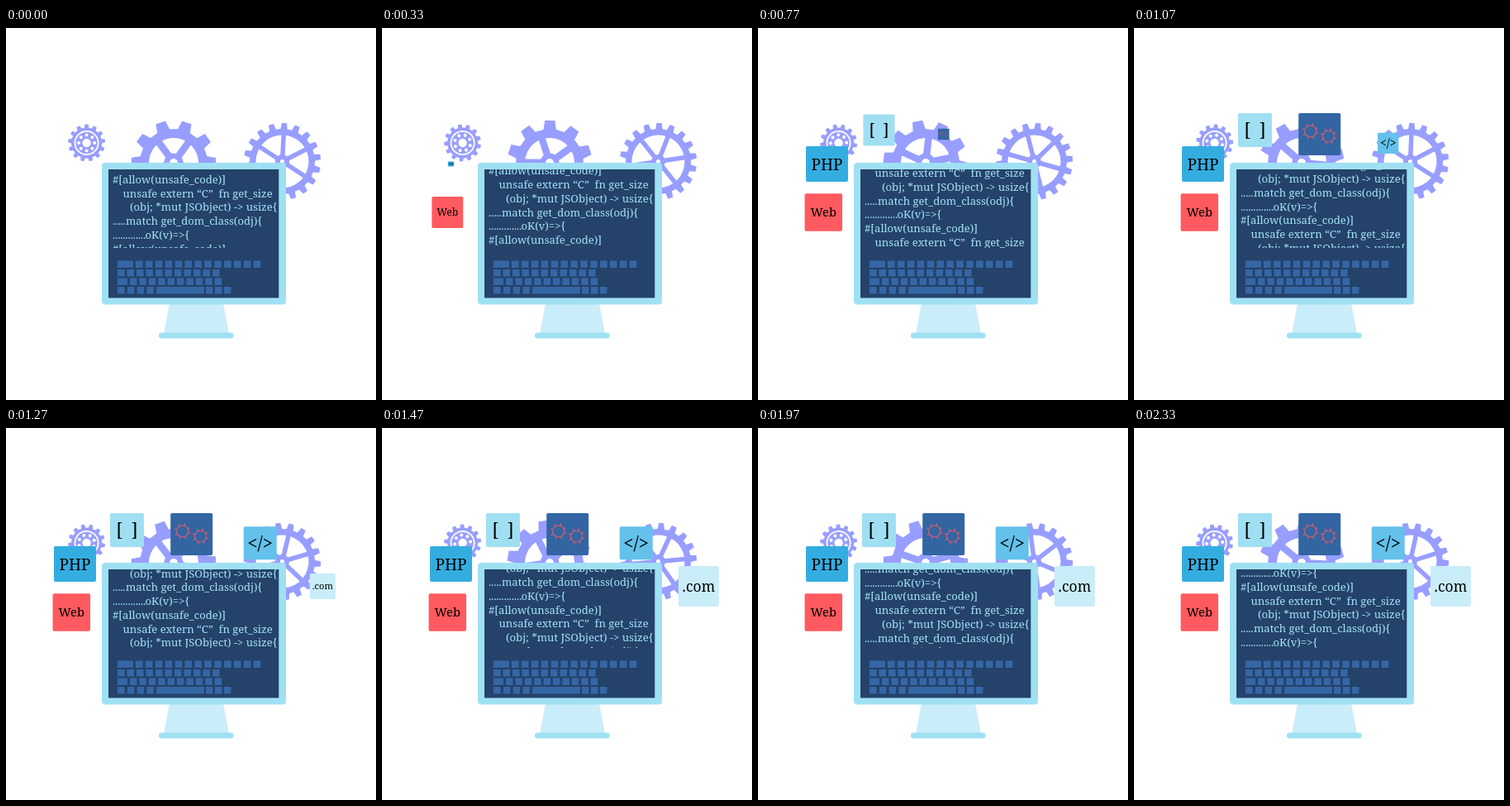
Write an HTML page that moves like this. It is 448x450 px and loops after 2.36 s.

```html
<!DOCTYPE html>
<html lang="en">
<head>
<meta charset="utf-8">
<title>Coding</title>
<style>
html, body { margin: 0; width: 100%; height: 100%; overflow: hidden; background: #fff; }
svg { display: block; width: 448px; height: 450px; }
text { font-family: "Noto Serif", "Liberation Serif", serif; }
#code { font-size: 13.1px; fill: #a5e3f7; }
.gear { fill: #989eff; fill-rule: evenodd; }
.tile text { text-anchor: middle; fill: #000; }
.cogs { fill: none; stroke: #ea5a68; stroke-width: 1.1; }
</style>
</head>
<body>
<svg viewBox="0 0 448 450">
  <defs><clipPath id="view"><rect x="124" y="171" width="206" height="95"/></clipPath></defs>
  <g id="gears"></g>
  <path d="M198 333H263L270 370H191Z" fill="#c9edf9"/>
  <rect x="185" y="368.5" width="90.5" height="7" rx="3" fill="#a0e0f3"/>
  <rect x="116" y="163" width="223" height="171.5" rx="4" fill="#a0e0f3"/>
  <rect x="124" y="171" width="206.3" height="155.5" fill="#24426a"/>
  <g id="keys" fill="#3566a5"></g>
  <g clip-path="url(#view)"><g id="code"></g></g>
  <g id="tiles"></g>
</svg>
<script>
const LOOP = 2360;
const SPIN = 0.0555; // degrees per ms, shared by all gears
const $ = id => document.getElementById(id);

function add(parent, tag, attrs, text) {
  const el = document.createElementNS('http://www.w3.org/2000/svg', tag);
  for (const k in attrs) el.setAttribute(k, attrs[k]);
  if (text) el.textContent = text;
  return parent.appendChild(el);
}

const polar = (r, a) =>
  (r * Math.sin(a)).toFixed(2) + ' ' + (-r * Math.cos(a)).toFixed(2);

const circle = (r, x = 0, y = 0) =>
  `M${x - r} ${y}a${r} ${r} 0 1 0 ${2 * r} 0a${r} ${r} 0 1 0 ${-2 * r} 0Z`;

// Toothed outline: n teeth, root radius r, tip radius R
function teeth(n, r, R, base = 0.6, tip = 0.38) {
  const step = 2 * Math.PI / n, pts = [];
  for (let i = 0; i < n; i++) {
    for (const [rad, f] of [[r, -base], [R, -tip], [R, tip], [r, base]]) {
      pts.push(polar(rad, (i + f / 2) * step));
    }
  }
  return 'M' + pts.join('L') + 'Z';
}

function gearGroup(x, y) {
  const outer = add($('gears'), 'g', { transform: `translate(${x} ${y})` });
  return add(outer, 'g', { class: 'gear' });
}

function spokedGear(x, y, phase, { n, R, root, rim, spokes, turn, width, hub, hole }) {
  const g = gearGroup(x, y);
  add(g, 'path', { d: teeth(n, root, R) + circle(rim) });
  for (let i = 0; i < spokes; i++) {
    add(g, 'rect', { x: -width / 2, y: -rim - 1, width, height: rim + 1,
      transform: `rotate(${turn + i * 360 / spokes})` });
  }
  add(g, 'circle', { r: hub });
  add(g, 'circle', { r: hole, fill: '#fff' });
  return { g, phase };
}

function bearing(x, y, phase) {
  const g = gearGroup(x, y);
  let d = teeth(13, 18.5, 22.5) + circle(15) + circle(13.2) + circle(5.2);
  for (let i = 0; i < 8; i++) {
    const [px, py] = polar(9.6, i * Math.PI / 4).split(' ').map(Number);
    d += circle(2, px, py);
  }
  add(g, 'path', { d });
  return { g, phase };
}

const gears = [
  bearing(97.6, 139, 0),
  spokedGear(203, 163, 18,
    { n: 10, R: 51.5, root: 41, rim: 30, spokes: 5, turn: 18, width: 8.5, hub: 11.5, hole: 5 }),
  spokedGear(334.5, 161.5, 3,
    { n: 18, R: 46.7, root: 39.5, rim: 32, spokes: 6, turn: 0, width: 5.5, hub: 8.5, hole: 2.5 })
];

// Keyboard
function keys(x, y, count, pitch, w = 8.5) {
  for (let i = 0; i < count; i++) {
    add($('keys'), 'rect', { x: x + i * pitch, y, width: w, height: 8.5 });
  }
}
keys(135, 281.5, 1, 0, 19);
keys(157, 281.5, 13, 11.9);
keys(135, 292, 11, 11.5);
keys(135, 302.5, 1, 0, 12);
keys(150, 302.5, 10, 11.4);
keys(135, 313, 4, 11.8);
keys(182, 313, 1, 0, 58);
keys(242, 313, 3, 11);

// Scrolling listing: [x, text] parts of each line
const lines = [
  [[129, '#[allow(unsafe_code)]']],
  [[141.5, 'unsafe extern “C”\u00a0 fn get_size']],
  [[150, '(obj; *mut JSObject) -> usize{']],
  [[129, '.....'], [145, 'match get_dom_class(odj){']],
  [[129, '.............'], [168.5, 'oK(v)=>{']]
];
for (let i = 0; i < 11; i++) {
  for (const [x, s] of lines[i % 5]) {
    const el = add($('code'), 'text', { x, y: 188 + i * 16.75 }, s);
    if (s[0] === '.') el.setAttribute('letter-spacing', -0.2);
  }
}

// Tiles, in order of appearance
function tile(x, y, w, h, fill, label, size, dy) {
  const g = add($('tiles'), 'g', { class: 'tile' });
  add(g, 'rect', { x: -w / 2, y: -h / 2, width: w, height: h, rx: 2, fill });
  if (label) add(g, 'text', { y: dy, 'font-size': size }, label);
  return { g, x, y };
}
const tiles = [
  tile(79.3, 223, 45.5, 45.5, '#ff5a5f', 'Web', 14.7, 5),
  tile(83.5, 164.5, 51, 43, '#33addf', 'PHP', 19, 7.2),
  tile(146.5, 123.5, 41, 41, '#a0dff2', '[\u00a0\u00a0]', 21, 7.2),
  tile(224.7, 128.5, 51, 51, '#3365a3'),
  tile(307.7, 139.3, 40, 40, '#63c1eb', '</>', 22, 7.7),
  tile(383.4, 191.5, 49, 49, '#c9edf9', '.com', 17.5, 6)
];
for (const [x, y] of [[-11, -3.5], [10.8, 2.5]]) {
  let d = circle(7);
  for (let i = 0; i < 8; i++) {
    const a = (i + 0.4) * Math.PI / 4;
    d += 'M' + polar(7, a) + 'L' + polar(10, a);
  }
  add(tiles[3].g, 'path', { d, class: 'cogs', transform: `translate(${x} ${y})` });
}

function draw(t) {
  for (const { g, phase } of gears) {
    g.setAttribute('transform', `rotate(${phase + SPIN * t})`);
  }
  $('code').setAttribute('transform', `translate(0 ${-0.0321 * t})`);
  tiles.forEach(({ g, x, y }, i) => {
    const u = Math.min(1, Math.max(0, (t - 35 - 200 * i) / 400));
    const s = u * u * (3 - 2 * u);
    g.setAttribute('visibility', s > 0 ? 'visible' : 'hidden');
    g.setAttribute('transform', `translate(${x} ${y}) scale(${s})`);
  });
}

function tick() {
  draw(performance.now() % LOOP);
  requestAnimationFrame(tick);
}
tick();
</script>
</body>
</html>
```
